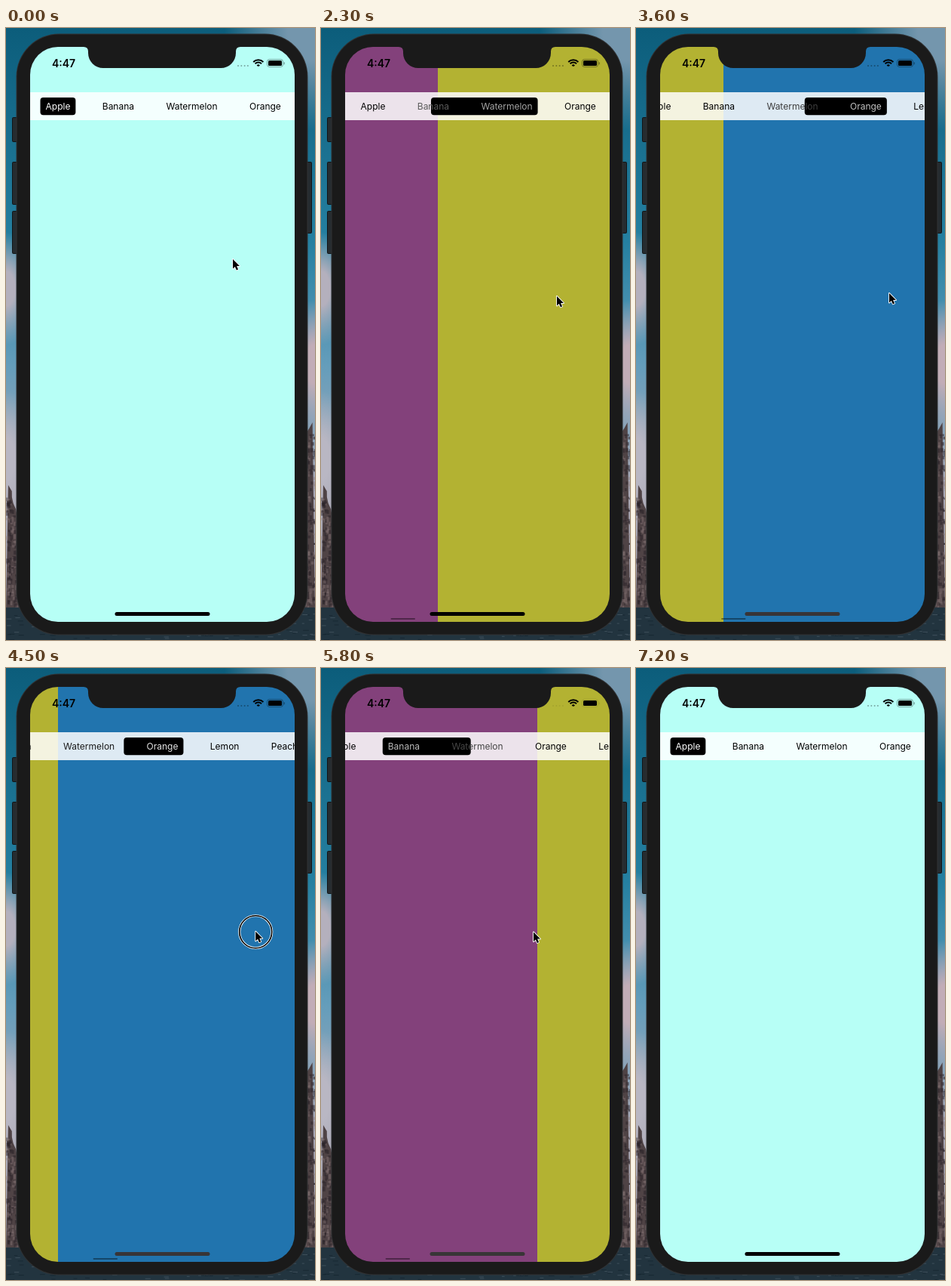
Animation, 410 px wide and 810 px high, one loop 7.3 s. Source, as an HTML page with a canvas:

```html
<!DOCTYPE html>
<html lang="en">
<head>
<meta charset="utf-8">
<title>Fruit pager</title>
<style>
  html, body { margin: 0; height: 100%; overflow: hidden; }
  canvas { display: block; }
</style>
</head>
<body>
<canvas width="410" height="810"></canvas>
<script>
const ctx = document.querySelector('canvas').getContext('2d');
const LOOP = 7300, STEP = 100;
const SCREEN = { x: 32, y: 25, w: 351, h: 761, r: 37 };
const PAGES = ['#b7fff6', '#83417b', '#b3b232', '#2174ae'];
const LABELS = ['Apple', 'Banana', 'Watermelon', 'Orange', 'Lemon', 'Peach'];
const LABEL_FONT = '12px Inter, sans-serif', LABEL_GAP = 42.4, PILL_PAD = 7;
const SWIPE_STARTS = [767, 1980, 3235, 4395, 5450, 6329];
const LAST_PAGE = 3, DRAG = 200, GLIDE = 500, PULL = 0.2;
// resting places of the pointer: time, x, y
const POINTER = [
  [0, 301, 306], [1300, 310, 330], [2300, 313, 355], [3600, 336, 351],
  [5200, 236, 347], [6400, 328, 352], [6650, 430, 354], [LOOP, 430, 354]
];

const clamp = v => Math.max(0, Math.min(1, v));
const mix = (a, b, k) => a + (b - a) * k;
const smooth = k => k * k * (3 - 2 * k);

function box(x, y, w, h, r, color) {
  ctx.fillStyle = color;
  ctx.beginPath();
  ctx.roundRect(x, y, w, h, r);
  ctx.fill();
}

function cloud(x, y, rx, ry, color) {
  ctx.save();
  ctx.translate(x, y);
  ctx.scale(rx, ry);
  const fill = ctx.createRadialGradient(0, 0, 0.3, 0, 0, 1);
  fill.addColorStop(0, color);
  fill.addColorStop(1, color + '00');
  ctx.fillStyle = fill;
  ctx.fillRect(-1, -1, 2, 2);
  ctx.restore();
}

// Rock wall that widens downwards from its peak at a stage edge.
function rock(edge, peak, slope, random) {
  const inward = edge ? -1 : 1;
  ctx.fillStyle = '#4f4345';
  ctx.beginPath();
  ctx.moveTo(edge, 775);
  for (let y = peak; y < 775; y += 8) {
    ctx.lineTo(edge + inward * ((y - peak) * slope + 3 + 3 * random()), y);
  }
  ctx.lineTo(edge + inward * 50, 775);
  ctx.fill();
  for (let i = 0; i < 120; i++) {
    const y = mix(peak + 15, 765, random());
    const reach = Math.min(14, (y - peak) * slope);
    ctx.fillStyle = random() < 0.6 ? '#2b252a88' : '#8a787866';
    ctx.fillRect(edge + inward * reach * random(), y, 2 + 2 * random(), 2 + 5 * random());
  }
}

function drawWallpaper() {
  let seed = 7;
  const random = () => (seed = seed * 16807 % 2147483647) / 2147483647;
  const sky = ctx.createLinearGradient(0, 0, 0, 810);
  sky.addColorStop(0, '#0c5d7b');
  sky.addColorStop(0.35, '#2580a1');
  sky.addColorStop(0.55, '#649dbb');
  sky.addColorStop(0.75, '#a9a8b5');
  ctx.fillStyle = sky;
  ctx.fillRect(0, 0, 410, 810);
  cloud(410, 5, 120, 130, '#7496ad');
  cloud(0, 345, 40, 75, '#b4b0bd');
  cloud(0, 570, 40, 90, '#b9b7c3');
  cloud(410, 445, 50, 85, '#c2adb7');
  rock(0, 605, 0.25, random);
  rock(410, 522, 0.5, random);
  ctx.fillStyle = '#22343f';
  ctx.fillRect(0, 767, 410, 43);
  for (let i = 0; i < 160; i++) {
    ctx.fillStyle = random() < 0.5 ? '#12202a99' : '#50626d99';
    ctx.fillRect(410 * random(), mix(767, 810, random()), 3 + 5 * random(), 1);
  }
}

function drawPhone() {
  [[8, 118, 33], [8, 177, 57], [8, 242, 57], [397, 177, 95]].forEach(([x, y, h]) => {
    box(x, y, 9, h, 2, '#111517');
    box(x + 1, y + 1, 7, h - 2, 1, '#262c30');
  });
  box(13.5, 7.5, 387, 796, 57, '#303234');
  box(14.5, 8.5, 385, 794, 56, '#1a1a1a');
}

function drawNotch() {
  ctx.fillStyle = '#1a1a1a';
  ctx.beginPath();
  ctx.moveTo(103, 24);
  ctx.lineTo(103, 25);
  ctx.quadraticCurveTo(109, 25, 109, 31);
  ctx.arcTo(109, 53, 129, 53, 20);
  ctx.arcTo(305, 53, 305, 33, 20);
  ctx.lineTo(305, 31);
  ctx.quadraticCurveTo(305, 25, 311, 25);
  ctx.lineTo(311, 24);
  ctx.fill();
}

function drawStatus(faint) {
  ctx.fillStyle = ctx.strokeStyle = '#000';
  ctx.font = '600 14px Inter, sans-serif';
  ctx.fillText('4:47', 61, 52);
  ctx.lineWidth = 2;
  for (const r of [9.3, 6, 2]) {
    ctx.beginPath();
    ctx.arc(334.8, 51.5, r, -Math.PI * 0.75, -Math.PI * 0.25);
    ctx.stroke();
  }
  const dim = faint ? '#00000014' : '#00000059';
  for (let i = 0; i < 4; i++) box(307 + i * 4.3, 49, 2, 2, 1, dim);
  ctx.strokeStyle = dim;
  ctx.lineWidth = 1;
  ctx.beginPath();
  ctx.roundRect(346.5, 41.5, 21, 10, 3);
  ctx.stroke();
  box(368.7, 45, 1.3, 3.5, 1, dim);
  box(348, 43, 18, 7, 1.5, '#000');
}

function layoutTabs() {
  let x = 52.5;
  ctx.font = LABEL_FONT;
  return LABELS.map(label => {
    const left = x, right = left + ctx.measureText(label).width;
    x = right + LABEL_GAP;
    return { label, left, right };
  });
}

// Scroll distance that centres a tab, never before the first one.
function centred({ left, right }) {
  return Math.max(0, (left + right) / 2 - SCREEN.x - SCREEN.w / 2);
}

function drawTabs(tabs, page, offset) {
  ctx.fillStyle = 'rgba(255,255,255,.85)';
  ctx.fillRect(SCREEN.x, 85, SCREEN.w, 37);
  // The leading edge moves in the first half, the trailing edge in the second.
  const i = Math.floor(page), q = page - i;
  const left = mix(tabs[i].left, tabs[i + 1].left, clamp(2 * q - 1)) - PILL_PAD - offset;
  const right = mix(tabs[i].right, tabs[i + 1].right, clamp(2 * q)) + PILL_PAD - offset;
  box(left, 92, right - left, 23.3, 4, '#000');
  ctx.font = LABEL_FONT;
  tabs.forEach((tab, n) => {
    const level = Math.round(255 * clamp(1 - Math.abs(n - page)));
    ctx.fillStyle = `rgb(${level},${level},${level})`;
    ctx.fillText(tab.label, tab.left - offset, 108);
  });
}

function drawPointer(t, sway, touching) {
  const n = POINTER.findIndex(key => key[0] > t);
  const [t0, x0, y0] = POINTER[n - 1], [t1, x1, y1] = POINTER[n];
  const k = (t - t0) / (t1 - t0);
  ctx.save();
  ctx.translate(mix(x0, x1, k) + sway, mix(y0, y1, k));
  if (touching) {
    for (const [color, width] of [['#fff', 3.2], ['#000', 1.6]]) {
      ctx.strokeStyle = color;
      ctx.lineWidth = width;
      ctx.beginPath();
      ctx.arc(0, 0.5, 21.5, 0, 2 * Math.PI);
      ctx.stroke();
    }
  }
  ctx.scale(0.9, 0.9);
  const arrow = new Path2D('M0 0V14L3.2 11.1L5.4 16L7.8 15L5.7 10.1H10Z');
  ctx.lineJoin = 'round';
  ctx.lineWidth = 2;
  ctx.strokeStyle = '#fff';
  ctx.stroke(arrow);
  ctx.fillStyle = '#000';
  ctx.fill(arrow);
  ctx.restore();
}

function stateAt(t, tabs) {
  const state = { page: 0, offset: 0, scroller: 0, sway: 0, touching: false };
  SWIPE_STARTS.forEach((start, i) => {
    const age = t - start, rest = age - DRAG - GLIDE;
    if (age < 0) return;
    // Forward to the last page, then back again.
    const from = LAST_PAGE - Math.abs(LAST_PAGE - i);
    const to = LAST_PAGE - Math.abs(LAST_PAGE - i - 1);
    const q = age < DRAG ? PULL * age / DRAG
      : 1 - (1 - PULL) * (1 - clamp((age - DRAG) / GLIDE)) ** 3;
    state.page = mix(from, to, q);
    state.offset = mix(centred(tabs[from]), centred(tabs[to]), smooth(clamp(rest / 300)));
    state.scroller = 1 - clamp((rest - 50) / 120);
    state.sway = 60 * (from - to) * Math.sin(Math.PI * clamp(age / 320));
    state.touching = age < DRAG;
  });
  return state;
}

function draw(t) {
  const tabs = layoutTabs();
  const { page, offset, scroller, sway, touching } = stateAt(t, tabs);
  const nearest = Math.round(page);
  drawWallpaper();
  drawPhone();

  ctx.save();
  ctx.beginPath();
  ctx.roundRect(SCREEN.x, SCREEN.y, SCREEN.w, SCREEN.h, SCREEN.r);
  ctx.clip();
  PAGES.forEach((color, i) => {
    ctx.fillStyle = color;
    ctx.fillRect(Math.round(SCREEN.x + SCREEN.w * (i - page)), SCREEN.y, SCREEN.w + 1, SCREEN.h);
  });
  drawTabs(tabs, page, offset);
  box(62 + 18.5 * page, 781, 32.5, 2, 1, `rgba(0,0,0,${0.4 * scroller})`);
  box(144.5, 773, 126, 5, 2.5, nearest % 2 ? '#383537' : '#000');
  ctx.restore();

  drawNotch();
  drawStatus(nearest === 1);
  drawPointer(t, sway, touching);
}

const began = performance.now();
function tick() {
  const t = (performance.now() - began) % LOOP;
  draw(Math.floor(t / STEP) * STEP);
  requestAnimationFrame(tick);
}
tick();
</script>
</body>
</html>
```
